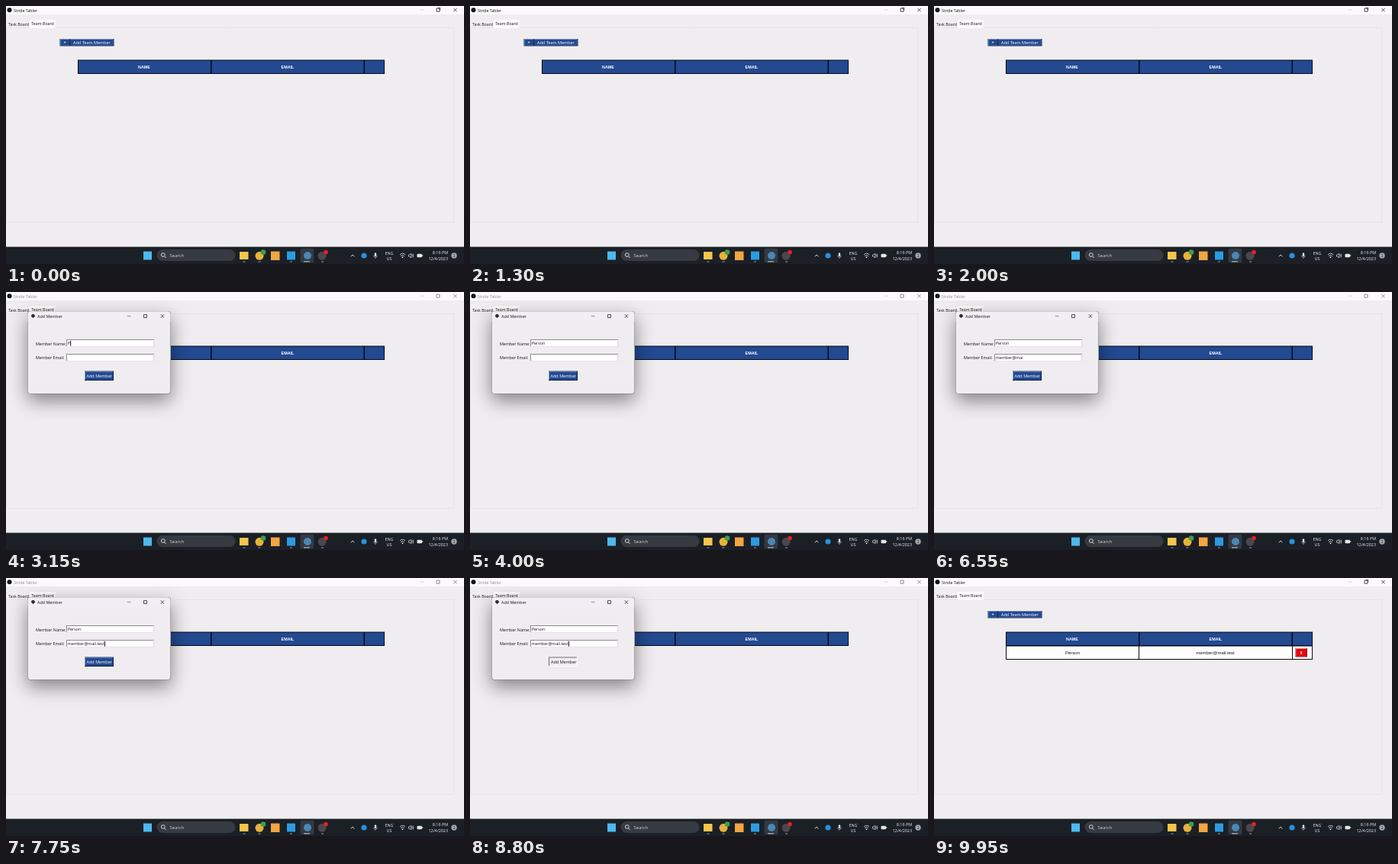
Recreate the animation shown at these times as an HTML page with a canvas. Size 600 by 338 pixels, loop 10 s.

```html
<!DOCTYPE html>
<html lang="en">
<head>
<meta charset="utf-8">
<title>Team board</title>
<style>
  html, body { margin: 0; height: 100%; overflow: hidden; background: #efedef; }
  canvas { display: block; }
</style>
</head>
<body>
<canvas id="stage" width="600" height="338"></canvas>
<script>
const ctx = document.getElementById('stage').getContext('2d');
const LOOP = 10000;
const UI = '"Open Sans", sans-serif';
const ARIAL = '"Liberation Sans", Arial, sans-serif';
const BLUE = '#234991', FACE = '#efedef', INK = '#151515';
const EMAIL = 'member@mail.test';

// Times in ms
const OPEN = 2220, CLOSE = 9100;
const NAME_KEYS = { start: 3100, step: 180 };
const EMAIL_FOCUS = 4900;
const EMAIL_KEYS = { start: 5250, step: 135 };
const PRESS = 8600;

function rect(x, y, w, h, fill) {
  ctx.fillStyle = fill;
  ctx.fillRect(x, y, w, h);
}

function round(x, y, w, h, r, fill) {
  ctx.beginPath();
  ctx.roundRect(x, y, w, h, r);
  ctx.fillStyle = fill;
  ctx.fill();
}

function disc(x, y, r, fill) {
  ctx.beginPath();
  ctx.arc(x, y, r, 0, Math.PI * 2);
  ctx.fillStyle = fill;
  ctx.fill();
}

function stroke(path, color, width = 0.8) {
  ctx.strokeStyle = color;
  ctx.lineWidth = width;
  ctx.stroke(new Path2D(path));
}

function text(str, x, y, { size = 5.4, color = INK, align = 'left', font = UI, weight = 400 } = {}) {
  ctx.font = `${weight} ${size}px ${font}`;
  ctx.fillStyle = color;
  ctx.textAlign = align;
  ctx.fillText(str, x, y);
}

function bevel(x, y, w, h, fill, light, dark) {
  rect(x, y, w, h, dark);
  rect(x, y, w - 1, h - 1, light);
  rect(x + 1, y + 1, w - 2, h - 2, fill);
}

function windowButtons(xMin, xMax, xClose, y, color, minColor) {
  stroke(`M${xMin - 2.5} ${y}h5`, minColor);
  stroke(`M${xMax - 2} ${y - 2}h4v4h-4z`, color);
  stroke(`M${xClose - 2.2} ${y - 2.2}l4.4 4.4m0 -4.4l-4.4 4.4`, color);
}

function mainWindow(active) {
  rect(0, 0, 600, 316, FACE);
  rect(0, 0, 600, 11, '#fbf9fb');
  disc(4.5, 5.3, 3, '#111');
  text('Stride Tabler', 10, 7.5, { size: 5.3, color: active ? INK : '#909090' });
  windowButtons(545, 566, 588.5, 5.2, active ? '#222' : '#777', '#d3d1d3');
  if (active) stroke('M565.5 2.4h3.2v3.4', '#222', 0.7);

  stroke('M0.5 28.5H586.5V283.5H0.5z', '#e5e3e6', 1);
  rect(1, 20, 30, 8, '#f1eff1');
  rect(31, 18, 34, 11, '#fcfbfc');
  text('Task Board', 3, 26.3, { size: 5.3 });
  text('Team Board', 33.2, 25.4, { size: 5.3 });

  bevel(70.5, 43, 71, 9.5, BLUE, '#7f93bd', '#14264f');
  rect(83, 43.5, 1, 8.5, '#14264f');
  text('+', 77, 49.8, { color: '#fff', align: 'center', weight: 700 });
  text('Add Team Member', 88, 49.8, { size: 5.5, color: '#fff' });
}

function tableRow(y, fill) {
  rect(94, y, 402, 18.5, '#050a18');
  for (const [x, w] of [[95, 173], [269, 200], [470, 25]]) rect(x, y + 1, w, 16.5, fill);
}

function table(filled) {
  const head = { size: 5.4, color: '#fff', align: 'center', font: ARIAL, weight: 700 };
  const cell = { size: 6, align: 'center', font: ARIAL };
  if (filled) {
    tableRow(88.5, '#fff');
    text('Person', 181.5, 99.8, cell);
    text(EMAIL, 368.5, 99.8, cell);
    bevel(473.5, 92, 15.5, 11.5, '#e6040c', '#ee7a7e', '#7c0a0e');
    text('X', 481, 99.5, { ...head, size: 4.8 });
  }
  tableRow(70.5, BLUE);
  rect(268, 71, 1.5, 18, '#050a18');
  rect(468.5, 71, 1.5, 18, '#050a18');
  text('NAME', 181, 81.6, head);
  text('EMAIL', 369, 81.6, head);
}

function typed(str, keys, t) {
  const count = Math.floor((t - keys.start) / keys.step) + 1;
  return str.slice(0, Math.max(0, count));
}

function entry(y, value, focusedFor) {
  bevel(79, y, 115.5, 10, '#fff', '#8d8b8d', '#e6e4e6');
  text(value, 80.8, y + 7.1, { size: 5.4 });
  const caretOn = focusedFor >= 0 && focusedFor % 900 < 600;
  if (caretOn) rect(81 + ctx.measureText(value).width, y + 1.8, 0.9, 6.8, '#000');
}

function dialog(t) {
  ctx.save();
  ctx.shadowColor = 'rgba(0,0,0,.45)';
  ctx.shadowBlur = 24;
  ctx.shadowOffsetY = 9;
  round(28, 25, 188, 108.5, 4, '#77757a');
  ctx.restore();
  round(28.6, 25.6, 186.8, 107.3, 3.5, FACE);
  round(28.6, 25.6, 186.8, 13, [3.5, 3.5, 0, 0], '#f1eef5');

  disc(35.5, 31.3, 2.4, '#2b2b2b');
  text('Add Member', 41, 33.8);
  windowButtons(161, 182.5, 204.8, 31.6, '#222', '#777');

  text('Member Name:', 39, 69.7);
  text('Member Email:', 39, 88.2, { size: 5.3 });
  const onEmail = t >= EMAIL_FOCUS;
  entry(62, typed('Person', NAME_KEYS, t), onEmail ? -1 : t - OPEN);
  entry(81, typed(EMAIL, EMAIL_KEYS, t), onEmail ? t - EMAIL_FOCUS : -1);

  const pressed = t >= PRESS;
  if (pressed) bevel(103, 103.5, 38, 12.5, FACE, '#6f6d70', '#fff');
  else bevel(103, 103.5, 38, 12.5, BLUE, '#8fa1c6', '#101d3d');
  const nudge = pressed ? 0.5 : 0;
  text('Add Member', 105.5 + nudge, 111.6 + nudge, { size: 5.5, color: pressed ? INK : '#fff' });
}

function taskbar() {
  const pale = '#e4e5e8';
  rect(0, 315.5, 600, 22.5, '#1b1f26');
  rect(180, 321.5, 11, 11, '#4db9ee');
  round(197.5, 319, 103, 15, 7.5, '#363a41');
  ctx.beginPath();
  ctx.arc(205.8, 326, 2.4, 0, 7);
  ctx.strokeStyle = pale;
  ctx.lineWidth = 0.9;
  ctx.stroke();
  stroke('M207.5 327.8l2.2 2.2', pale, 0.9);
  text('Search', 214.5, 329.2, { size: 6, color: '#d0d1d4' });

  rect(306, 322, 11.5, 10, '#f6c64b');
  disc(332, 327.3, 5.5, '#e5b23a');
  disc(337, 322.6, 3.3, '#3f9f4c');
  rect(347, 321.5, 11.5, 11.5, '#f4a544');
  rect(368, 321.5, 11, 11, '#2b9ce2');
  round(385.5, 317.5, 18, 18.5, 2, '#343941');
  disc(395, 327, 5, '#4b87b6');
  disc(414, 327.3, 5.5, '#48484c');
  disc(419, 322.6, 2.8, '#e5202b');
  for (const x of [312, 332, 373.5, 414.5]) rect(x - 1.5, 334.5, 3, 1, '#9a9da2');
  rect(390, 334.3, 8, 1.2, '#a9bccb');

  stroke('M451.7 328.3l2.3 -2.4l2.3 2.4', pale, 0.9);
  disc(469, 327, 3.6, '#2492df');
  round(482.8, 323.3, 2.4, 4.6, 1.2, pale);
  stroke('M481.7 326.7q0 2.6 2.3 2.6t2.3 -2.6M484 329.3v1.6', pale, 0.6);

  const label = { size: 5.4, color: '#f0f0f2' };
  text('ENG', 502, 325.7, { ...label, align: 'center' });
  text('US', 502, 332.8, { ...label, align: 'center' });
  stroke('M516 325.8q3.5 -3.2 7 0M517.2 327.5q2.3 -2 4.6 0', pale, 0.8);
  disc(519.5, 329.2, 0.9, pale);
  stroke('M527.5 325.8h1.4l1.8 -1.8v6l-1.8 -1.8h-1.4zM531.8 325.5q1 1.5 0 3M533 324.4q1.8 2.6 0 5.2', pale, 0.7);
  round(538.5, 324.8, 6.5, 4.4, 1, pale);
  rect(545.3, 326, 0.8, 2, pale);
  text('8:16 PM', 579, 325.2, { ...label, align: 'right' });
  text('12/4/2023', 579, 332.7, { ...label, align: 'right' });
  disc(587, 327, 3.7, '#a3a6ab');
  text('2', 587, 328.8, { size: 4.8, color: '#1b1f26', align: 'center' });
}

function draw() {
  const t = performance.now() % LOOP;
  const dialogOpen = t >= OPEN && t < CLOSE;
  mainWindow(!dialogOpen);
  table(t >= CLOSE);
  if (dialogOpen) dialog(t);
  taskbar();
  requestAnimationFrame(draw);
}
draw();
</script>
</body>
</html>
```
